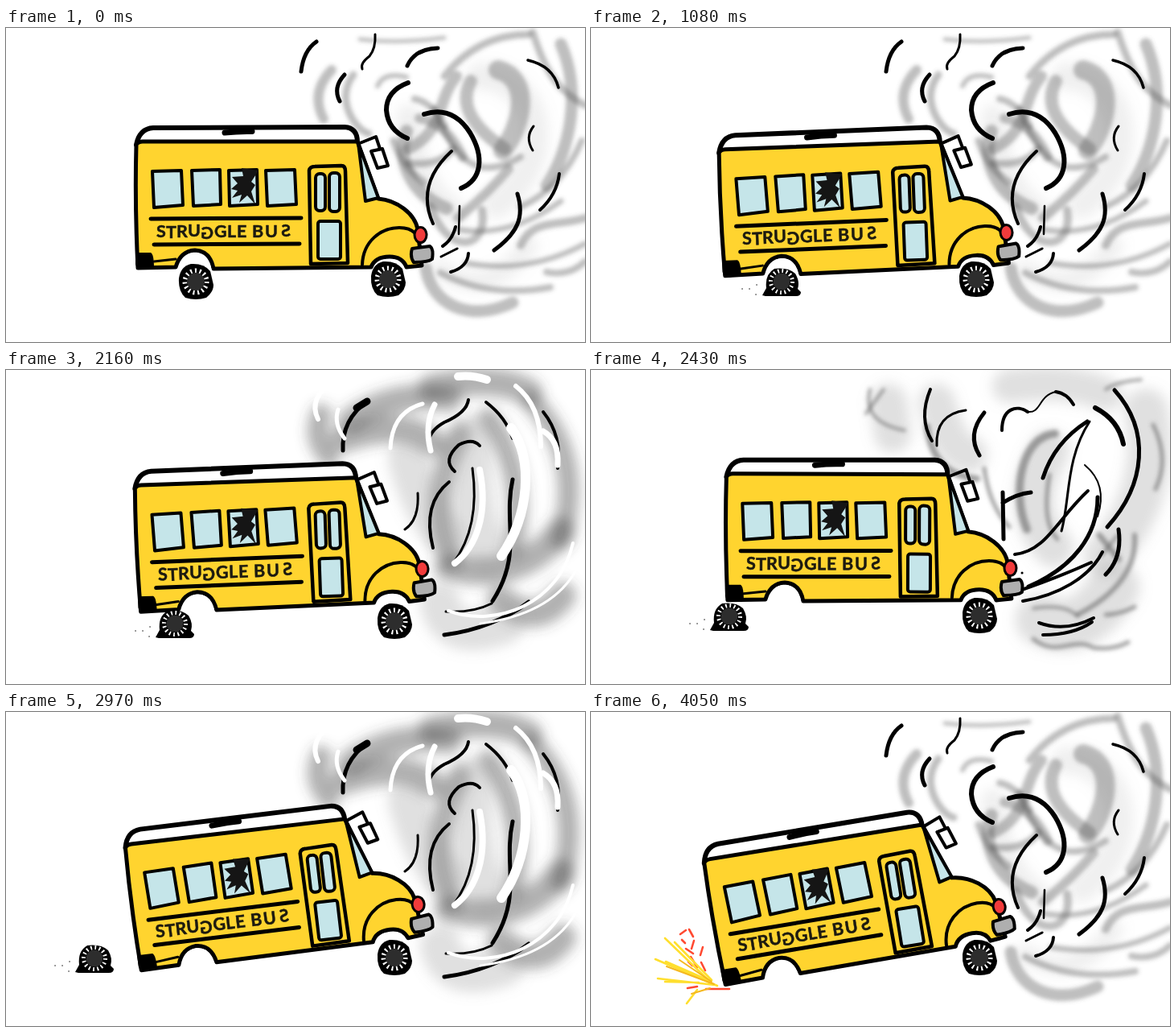
An HTML page that plays this animation: 720x390 px, repeating every 4320 ms.

```html
<!DOCTYPE html>
<html lang="en">
<head>
<meta charset="utf-8">
<title>Struggle bus</title>
<style>
  html, body { margin: 0; width: 100%; height: 100%; overflow: hidden; background: #fff; }
  svg { display: block; width: 100%; height: 100%; }
  .line { fill: none; stroke: #000; stroke-linecap: round; stroke-linejoin: round; }
  .ink { stroke: #000; stroke-linecap: round; stroke-linejoin: round; }
  .glass { fill: #c5e5e9; stroke-width: 4; }
  text { font: 700 21.5px Lato, "Open Sans", sans-serif; fill: #1c1a10; stroke: #1c1a10; stroke-width: .5; stroke-linejoin: round; }
</style>
</head>
<body>
<svg viewBox="0 0 720 390">
  <defs>
    <filter id="soft" filterUnits="userSpaceOnUse" x="300" y="-40" width="460" height="460"><feGaussianBlur stdDeviation="2.5"/></filter>
    <filter id="cloud" filterUnits="userSpaceOnUse" x="300" y="-40" width="460" height="460"><feGaussianBlur stdDeviation="8"/></filter>
    <g id="tyre">
      <path d="M-21 -4 Q-19 -19 -6 -22 Q10 -23 18 -13 L22 4 Q22 13 13 20 Q0 24 -13 20 Q-22 12 -21 -4Z"/>
      <circle r="13.500" fill="none" stroke="#fff" stroke-width="6" stroke-dasharray="2 3.650"/>
      <circle r="11" fill="#2d2d2d"/>
    </g>
    <g id="flatTyre">
      <path d="M-24 17 L-19 8 Q-21 -9 -9 -16 Q8 -18 17 -10 Q23 0 20 9 L24 13 Q24 18 18 18 L-20 18Z"/>
      <circle r="13.500" fill="none" stroke="#fff" stroke-width="5" stroke-dasharray="1.8 3.500"/>
      <circle r="10.500" fill="#2d2d2d"/>
      <path class="line" stroke-width="1.3" d="M-31 4h.1M-32 16h.1M-40 9h.1M-49 9h.1"/>
    </g>
  </defs>

  <g id="smokes"></g>

  <g id="bus">
    <path class="ink" fill="#fff" stroke-width="6" d="M162 145 Q166 125 183 124 L421 123 Q437 124 437 142Z"/>
    <path class="ink" fill="#ffd42f" stroke-width="5" d="M162 145 Q164 141 170 141 L437 141 L463 212 C486 214 508 230 512 250 L517 295 L498 297 Q493 284 477 284 Q459 284 454 297 L258 299 Q254 277 235 276 Q217 277 211 297 L164 298 Q160 220 162 145Z"/>
    <path fill="#fff" d="M213 302 Q218 279 235 279 Q252 279 256 302Z M457 300 Q461 287 477 287 Q492 287 496 300Z"/>
    <path d="M161 279 L180 279 Q184 281 184 298 L169 300 Q162 299 161 293Z"/>
    <path class="line" stroke-width="3" d="M184 290 L211 287"/>
    <path class="line" stroke-width="7" d="M272 130 Q290 128 306 128.500"/>
    <path class="ink glass" d="M438 143 L463 211 L447 215Z"/>
    <path class="line" stroke-width="4" d="M440 143 L460 135 L465 150"/>
    <path class="ink" fill="#fff" stroke-width="4" d="M454 153 L468 150 L475 171 L462 174Z"/>

    <g class="ink glass">
      <path d="M182 178 L218 177 L220 220 L184 223Z"/>
      <path d="M231 177 L266 176 L267 219 L233 221Z"/>
      <path d="M277 177 L312 176 L313 219 L278 221Z"/>
      <path d="M323 177 L359 176 L361 219 L325 221Z"/>
    </g>
    <path fill="#151515" d="M293 174 L295 184 L281 185 L288 193 L280 200 L288 202 L281 211 L293 207 L290 217 L300 208 L310 219 L305 203 L310 195 L305 191 L314 177Z"/>

    <path class="line" stroke-width="4.500" d="M379 293 L377 177 Q378 172 384 172 L417 171 Q422 171 422 178 L425 292Z"/>
    <g class="ink glass">
      <rect x="385" y="181" width="12" height="46" rx="5"/>
      <rect x="402" y="180" width="13" height="48" rx="5"/>
      <rect x="388" y="240" width="28" height="47" rx="3"/>
    </g>

    <path class="line" stroke-width="5" d="M180 237 L367 236 M184 269 L365 268"/>
    <g>
      <text x="187 199 212 226" y="260 261 260 259">STRU</text>
      <text transform="translate(258 262) scale(-1 1)">G</text>
      <text x="259 275 287" y="260">GLE</text>
      <text x="306 322" y="260">BU</text>
      <text transform="translate(354 259) scale(-1 1)">S</text>
    </g>

    <path class="line" stroke-width="4" d="M443 294 C444 265 466 248 489 248 Q505 248 511 258"/>
    <path class="ink" fill="#afafaf" stroke-width="4" d="M505 274 L527 271 Q532 274 530 287 Q525 291 507 291 Q502 284 505 274Z"/>
    <ellipse class="ink" cx="515.500" cy="257" rx="7.500" ry="9.500" fill="#f13b3b" stroke-width="3"/>
  </g>

  <use id="frontWheel" href="#tyre"/>
  <use id="rearWheel" href="#tyre"/>

  <g id="sparks" fill="none" stroke-linecap="round" stroke-width="2.600">
    <path stroke="#ff4a32" d="M111 276 l7 -5 M122 270 l5 9 M113 283 l4 4 M128 284 l-3 10 M118 294 l9 6 M124 304 l8 13 M139 292 l-3 10 M137 311 l5 10 M121 310 l5 5 M143 344 l29 0 M120 343 l12 -2"/>
    <path stroke="#ffdf2e" d="M157 340 L80 307 M148 334 L93 310 M150 333 L104 286 M154 339 L83 331 M134 336 L92 335 M132 345 L119 362 M146 333 L92 281"/>
    <path stroke="#f5b81f" stroke-width="2" d="M153 338 L94 316 M150 335 L110 308 M148 343 L125 350"/>
  </g>
</svg>
<script>
const FRAME_MS = 270;
const $ = id => document.getElementById(id);

// Each layer: colour, opacity, filter, then "width path" strokes.
const SMOKE = {
  A: [
    ['#999', .16, 'cloud', '34 M590 60 C660 60 690 160 610 220', '30 M500 110 Q510 200 560 230', '24 M540 300 Q600 340 650 270'],
    ['#555', .38, 'soft',
      '12 M405 52 Q378 80 395 113', '9 M432 58 C408 90 436 128 451 131', '6 M462 72 Q470 54 498 61',
      '9 M545 60 C580 16 620 8 650 8', '24 M612 52 C652 62 644 118 618 152', '16 M578 66 C560 100 590 130 620 150',
      '15 M690 20 C716 80 702 150 672 196', '9 M655 5 C672 60 690 80 720 96', '8 M640 222 Q690 200 716 140',
      '16 M498 128 C486 160 500 205 548 224', '12 M514 112 Q548 118 568 160', '9 M500 168 Q540 172 556 150',
      '14 M560 60 C535 90 545 130 500 150', '12 M625 175 Q600 205 562 236', '8 M532 100 C560 170 590 190 640 160',
      '9 M482 140 Q492 172 520 192', '8 M508 88 Q530 92 546 122', '10 M528 222 C550 285 600 275 592 226',
      '15 M522 298 C528 340 572 368 630 341', '8 M540 304 Q600 336 677 322', '7 M572 292 Q650 306 720 268',
      '10 M640 270 C654 236 690 246 720 236', '8 M672 303 Q700 309 720 290', '7 M560 250 Q625 262 690 215', '5 M440 14 Q490 20 545 12']
    ,
    ['#000', 1, '',
      '5 M367 54 Q370 28 386 17', '5 M415 91 Q406 74 421 58', '3 M443 51 Q440 44 452 35 Q460 25 459 8',
      '5 M499 47 Q508 26 537 25', '6 M500 68 Q473 78 473 102 Q475 127 499 137',
      '6 M520 107 Q555 96 577 130 C595 160 592 188 566 199', '4 M554 153 C530 175 514 205 531 243',
      '3.500 M649 40 Q680 47 687 74', '3 M656 122 Q645 136 655 152', '4 M688 181 Q685 207 664 226',
      '5 M636 206 C645 235 636 255 607 276', '4 M559 247 Q555 263 543 271', '2.500 M564 221 L563 256',
      '3 M541 284 L561 274', '4 M553 303 Q574 297 575 280']
  ],
  B: [
    ['#999', .3, 'cloud', '46 M370 40 L375 80', '46 M430 40 Q445 100 470 105', '42 M520 20 Q590 10 640 30',
      '50 M570 100 Q530 170 575 220', '54 M690 50 Q710 150 640 230', '65 M560 310 Q610 335 650 270'],
    ['#666', .6, 'soft', '4 M347 24 Q337 65 390 75', '4 M364 24 L342 54', '4 M684 12 Q655 14 640 24',
      '5 M699 68 Q720 110 702 148', '10 M577 79 C536 82 522 150 542 198', '5 M489 122 Q495 168 520 195',
      '8 M418 70 Q425 130 480 135', '6 M676 205 Q680 265 605 304', '5 M550 334 C580 358 600 330 625 345 Q650 348 668 338',
      '7 M632 205 L656 235', '4 M655 205 L635 230', '5 M570 130 Q560 190 580 210', '5 M640 304 Q660 303 676 294',
      '4 M550 296 Q590 290 605 306'],
    ['#000', 1, '',
      '4 M422 24 Q407 60 424 88', '3 M466 50 Q428 55 430 94', '5 M489 53 Q467 80 483 106',
      '4 M511 75 C511 47 530 43 543 52', '2 M543 52 C560 54 556 32 578 27', '4 M578 27 Q592 29 600 43',
      '5 M617 64 Q576 90 562 134', '3 M620 64 C590 110 596 160 585 200', '6 M627 47 Q656 62 662 92',
      '5 M651 25 C696 75 690 142 642 195', '2 M614 118 Q643 142 630 182', '5 M547 152 Q529 154 512 165 M512 152 L513 210',
      '4 M527 229 C566 225 580 185 618 150', '5 M630 158 C630 205 600 245 544 269',
      '4 M537 287 C580 280 620 258 636 226', '4 M530 275 Q580 258 622 239', '5 M656 198 Q661 233 640 254',
      '4 M557 314 Q590 326 625 308', '4 M562 329 Q600 329 623 313', '3 M536 252 h.1']
  ],
  C: [
    ['#444', .42, 'cloud', '26 M392 55 Q380 85 402 108', '32 M430 62 Q485 25 550 36', '34 M530 22 Q610 5 650 28',
      '34 M420 85 Q495 60 530 90', '26 M655 40 Q720 110 690 210', '26 M600 60 Q650 130 630 220',
      '28 M565 80 Q520 160 555 235', '34 M550 245 Q640 265 690 200', '34 M615 285 Q660 322 692 280'],
    ['#999', .3, 'cloud', '50 M500 110 Q515 170 545 205', '50 M540 290 Q550 340 620 315', '50 M580 80 Q575 180 600 230'],
    ['#000', 1, '',
      '5 M419 100 Q417 62 450 38', '9 M436 47 L449 39', '4 M575 37 Q573 53 545 65 Q527 75 525 90',
      '4 M558 126 Q542 112 563 93 Q580 84 589 94', '4 M551 139 Q517 166 531 221', '3 M512 153 Q514 186 496 198',
      '4 M597 40 Q622 59 630 85', '5 M630 136 C618 190 643 228 605 287', '4 M668 52 Q692 82 686 122',
      '3 M580 122 Q590 195 556 240', '5 M545 329 C585 324 623 309 650 288', '3 M547 300 Q580 302 604 290'],
    ['#fff', 1, '',
      '6 M408 13 Q375 35 388 61', '5 M413 49 Q407 67 421 85', '5 M518 42 Q480 52 478 97', '7 M533 43 Q520 68 528 100',
      '10 M562 8 Q580 6 598 12', '12 M628 72 C657 110 650 182 616 231', '8 M589 124 C600 178 585 220 558 240',
      '6 M634 20 Q665 44 665 95', '7 M668 76 Q688 87 686 118', '4 M705 215 C688 290 610 321 550 299',
      '3 M720 220 Q700 300 590 315']
  ]
};

// Strokes are translucent one by one, so crossings darken.
$('smokes').innerHTML = Object.entries(SMOKE).map(([name, layers]) =>
  `<g id="smoke${name}">` + layers.map(([color, opacity, filter, ...strokes]) =>
    `<g class="line" style="stroke:${color}" stroke-opacity="${opacity}"${filter && ` filter="url(#${filter})"`}>` +
    strokes.map(s => {
      const [width, ...path] = s.split(' ');
      return `<path stroke-width="${width}" d="${path.join(' ')}"/>`;
    }).join('') + '</g>').join('') + '</g>').join('');

const SMOKE_ORDER = 'ACCBACBACBACBACA';
// Tilt in degrees and offset of the bus, turning about its headlight.
const POSES = [
  [0, 0, 0], [0, 4, -3], [-1.2, 1, -2], [-3.5, -2, -8],
  [-2.1, 1, -3], [-.8, 3, -6], [-3.9, 0, -10], [-4.5, -1, -11],
  [-2, 2, -10], [.2, 6, -11], [-3.3, 2, -14], [-6.7, -3, -18],
  [-3.5, 0, -15], [-.3, 3, -10], [-4.8, -2, -14], [-9.2, -8, -15]
];
const REAR_X = [236, 236, 236, 236, 237, 237, 237, 237, 210, 172, 132, 110, 70, 55];

const show = (id, visible) => $(id).style.display = visible ? '' : 'none';
const move = (id, x, y) => $(id).setAttribute('transform', `translate(${x} ${y})`);

function draw() {
  const step = Math.floor(performance.now() / FRAME_MS) % POSES.length;
  const [tilt, dx, dy] = POSES[step];
  for (const name in SMOKE) show('smoke' + name, name === SMOKE_ORDER[step]);
  $('bus').setAttribute('transform', `translate(${dx} ${dy}) rotate(${tilt} 515 256)`);
  move('frontWheel', 475 + Math.min(step, 8), step < 9 ? 312 : 305);

  const rearVisible = step < REAR_X.length;
  show('rearWheel', rearVisible);
  if (rearVisible) {
    $('rearWheel').setAttribute('href', step < 2 ? '#tyre' : '#flatTyre');
    move('rearWheel', REAR_X[step], step < 9 ? 315 : step < 12 ? 306 : 311);
  }
  show('sparks', step === 15);
  requestAnimationFrame(draw);
}
draw();
</script>
</body>
</html>
```
